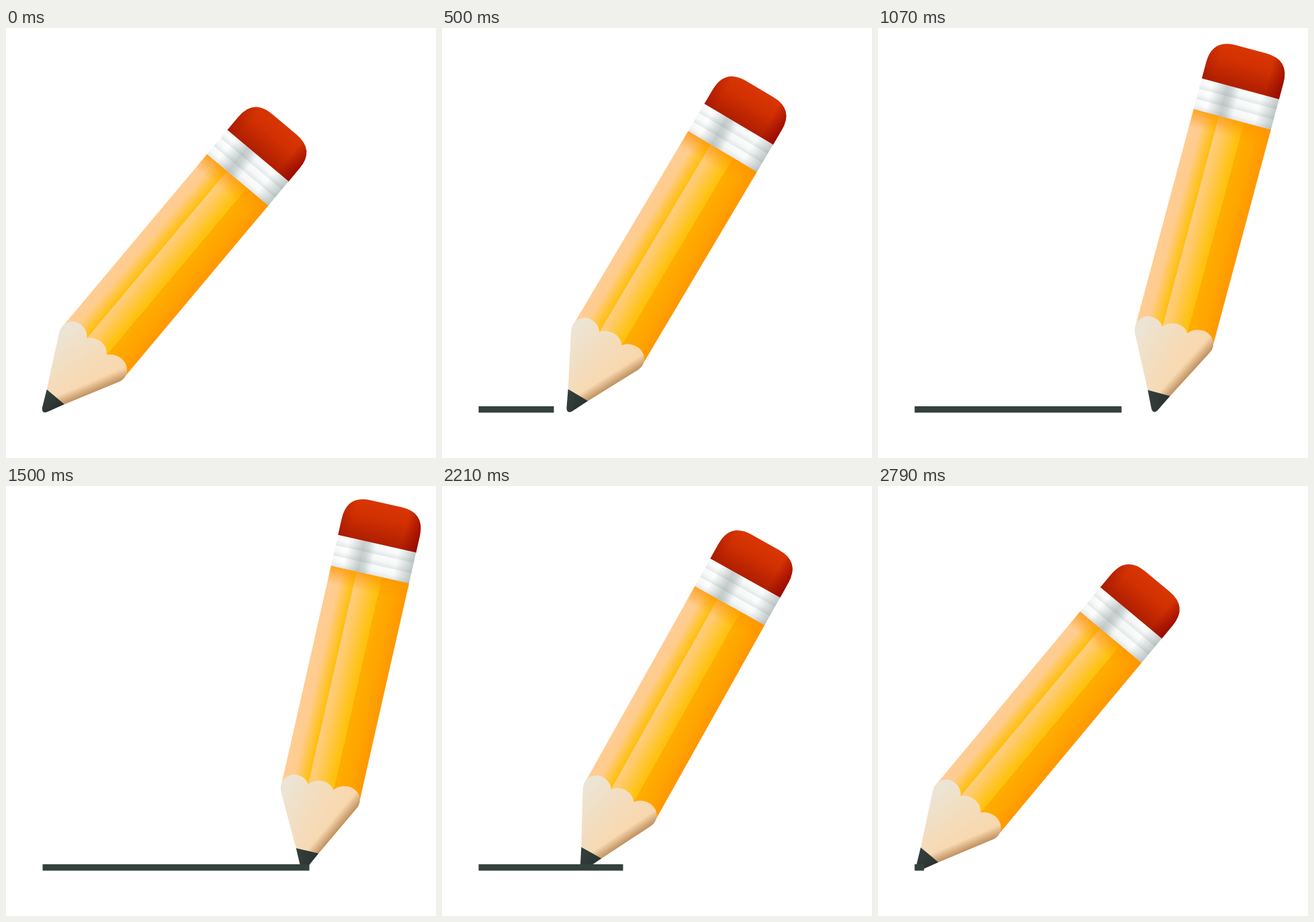
Recreate the animation shown at these times as an HTML page with a canvas. Size 640 px wide and 640 px high, loop 2870 ms.

```html
<!DOCTYPE html>
<html lang="en">
<head>
<meta charset="utf-8">
<title>Pencil drawing a line</title>
<style>
  html, body { margin: 0; width: 100%; height: 100%; overflow: hidden; background: #fff; }
  canvas { display: block; width: 640px; height: 640px; }
</style>
</head>
<body>
<canvas id="stage" width="640" height="640"></canvas>
<script>
const ctx = document.getElementById('stage').getContext('2d');
const LOOP = 2870, FPS = 14, STEPS = 40;
const LINE_X = 54.5, TIP_X = 55, TIP_Y = 571.5;

// [step, value] keys, joined by smooth curves
const tipKeys = [[0, 55], [7, 187.5], [15, 410.5], [19, 455], [21, 442], [25, 374], [31, 208], [35, 112], [39, 58], [40, 55]];
const lineKeys = [[0, 0], [7, 112], [15, 308], [20, 403], [21, 397], [25, 336], [31, 215], [39, 14], [40, 0]];

function slope(keys, i) {
  if (i === 0 || i === keys.length - 1) return 0;
  return (keys[i + 1][1] - keys[i - 1][1]) / (keys[i + 1][0] - keys[i - 1][0]);
}

function sample(keys, t) {
  let i = 0;
  while (i < keys.length - 2 && t >= keys[i + 1][0]) i++;
  const [t0, a] = keys[i], [t1, b] = keys[i + 1];
  const span = t1 - t0, u = (t - t0) / span;
  const ease = u * u * (3 - 2 * u);
  return a + (b - a) * ease
    + span * u * (1 - u) * ((1 - u) * slope(keys, i) - u * slope(keys, i + 1));
}

function gradient(x0, y0, x1, y1, ...stops) {
  const g = ctx.createLinearGradient(x0, y0, x1, y1);
  stops.forEach(([at, color]) => g.addColorStop(at, color));
  return g;
}

function rect(x, y, w, h, fill) {
  ctx.fillStyle = fill;
  ctx.fillRect(x, y, w, h);
}

const eraser = new Path2D('M-59.5-497V-523Q-59.5-559-23.5-559H23.5Q59.5-559 59.5-523V-497Z');
const wood = new Path2D(`M-17.2-29.3L-57-105Q-60-111-60-116C-60-128-50-136-40-136
  C-31-136-24-132-20.5-126C-16-132-9-135.5-1-135.5C8-135.5 14-132 18-126
  C22-132 30-136 39-136C50-136 60-128 60-116Q60-111 56.5-105L17.2-29.3Z`);
const lead = new Path2D('M-17.2-29.3H17.2L4.8-4Q0 3.6-4.8-4Z');

// Pencil stands upright with its tip at the origin
const shade = {
  left: gradient(-60, 0, -20, 0, [0, '#ffcc94'], [.42, '#ffcc8e'], [.95, '#ffc010'], [1, '#ffbf08']),
  middle: gradient(-20.5, 0, 18, 0, [0, '#ffcd80'], [.25, '#ffca68'], [.9, '#ffc210'], [1, '#ffc20c']),
  right: gradient(18, 0, 60, 0, [0, '#ffad00'], [.5, '#ffa500'], [1, '#ff9700']),
  top: gradient(0, -451, 0, -424, [0, 'rgba(255,150,0,.75)'], [1, 'rgba(255,150,0,0)']),
  metal: gradient(-60, 0, 60, 0, [0, '#f7f9f9'], [.15, '#fff'], [.34, '#c6cece'],
    [.4, '#d0d7d7'], [.5, '#f8fafa'], [.78, '#fcfdfd'], [1, '#c0c8c8']),
  rubber: gradient(0, -559, 0, -497, [0, '#d93603'], [.4, '#d13002'], [1, '#ae1e00']),
  rubberSide: gradient(-60, 0, 60, 0, [0, 'rgba(150,15,0,.3)'], [.15, 'rgba(150,15,0,0)'],
    [.8, 'rgba(140,0,0,0)'], [1, 'rgba(140,0,0,.7)']),
  wood: gradient(-55, -100, 45, -75, [0, '#ece4d4'], [.5, '#f4dcbb'], [1, '#fad6a9']),
  woodSide: gradient(-12.4, -6.4, 1.8, .9, [0, 'rgba(184,137,88,0)'], [1, 'rgba(184,137,88,.9)']),
  lead: gradient(-16, 0, 16, 0, [0, '#35403d'], [1, '#2a3230'])
};

function fillPath(path, ...fills) {
  for (const fill of fills) {
    ctx.fillStyle = fill;
    ctx.fill(path);
  }
}

function drawPencil(x) {
  ctx.save();
  ctx.translate(x, TIP_Y);
  ctx.rotate((40 - (x - TIP_X) * .0703) * Math.PI / 180);

  const bodyHeight = 335;
  rect(-59.5, -451, 40, bodyHeight, shade.left);
  rect(17.5, -451, 42, bodyHeight, shade.right);
  rect(-20.5, -451, 38.5, bodyHeight, shade.middle);
  rect(-59.5, -451, 119, 27, shade.top);

  fillPath(eraser, shade.rubber, shade.rubberSide);
  rect(-59.5, -498, 119, 47, shade.metal);
  for (let i = 0; i < 3; i++) {
    const y = -498 + i * 15.7;
    rect(-59.5, y, 119, 15.7, gradient(0, y, 0, y + 15.7,
      [0, 'rgba(110,130,130,0)'], [.5, 'rgba(110,130,130,.02)'], [1, 'rgba(110,130,130,.17)']));
  }

  fillPath(wood, shade.wood, shade.woodSide);
  fillPath(lead, shade.lead);
  ctx.restore();
}

function draw() {
  const time = performance.now() % LOOP;
  const step = Math.min(STEPS - 1, Math.floor((time + 5) * FPS / 1000));
  rect(0, 0, 640, 640, '#fff');
  drawPencil(sample(tipKeys, step));
  rect(LINE_X, 563, sample(lineKeys, step), 9.5, '#34413b');
  requestAnimationFrame(draw);
}
draw();
</script>
</body>
</html>
```
